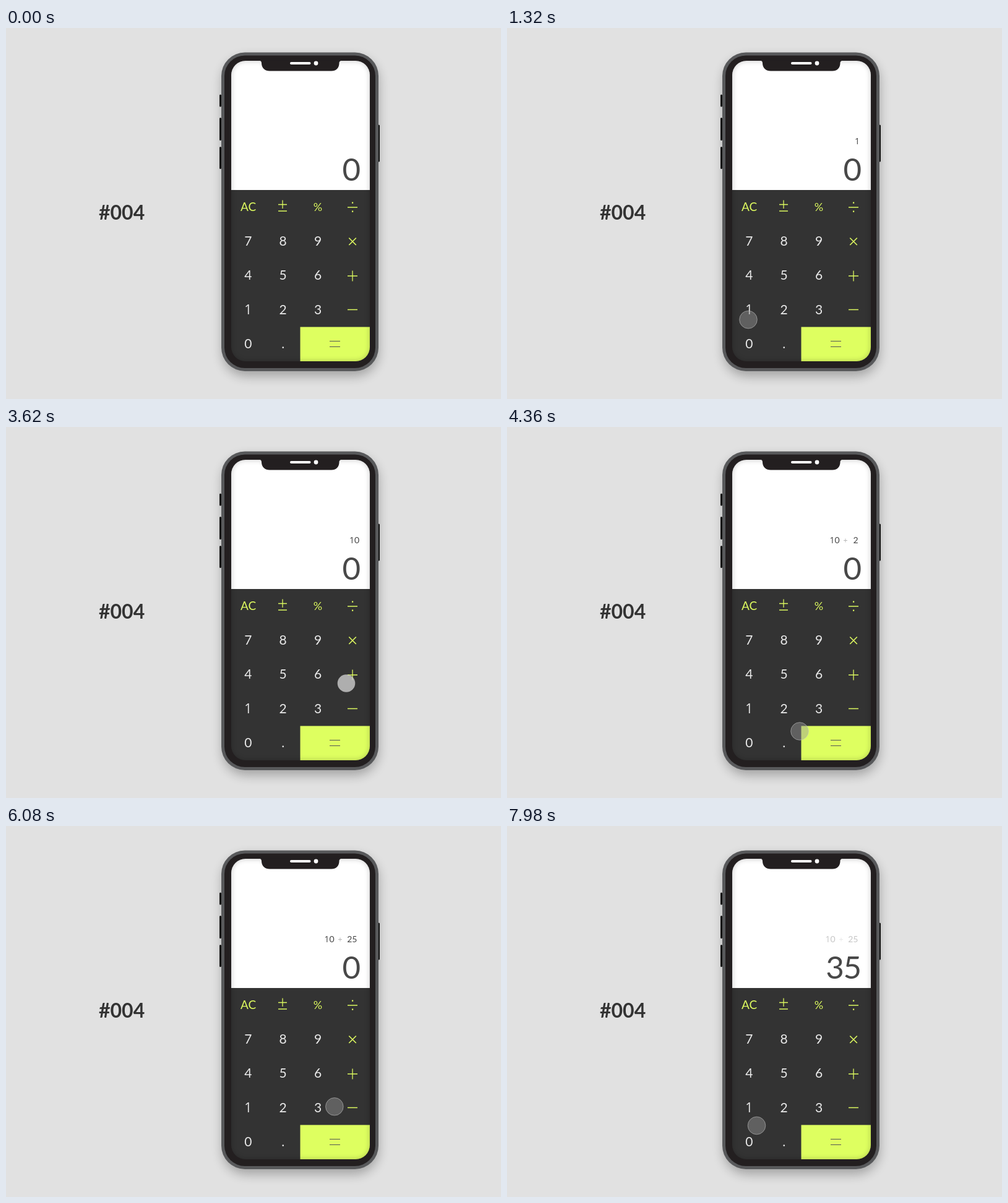
These frames come from a looping animation (800x600 px, 8000 ms). An HTML page:

```html
<!DOCTYPE html>
<html lang="en">
<head>
<meta charset="utf-8">
<title>Calculator</title>
<style>
  html, body { margin: 0; width: 100%; height: 100%; overflow: hidden; background: #e1e1e1; }
  svg { display: block; width: 800px; height: 600px; font-family: Lato, sans-serif; }
  .one { font-family: "Open Sans", sans-serif; }
  #keys text { text-anchor: middle; font-size: 21px; fill: #e9e9e9; }
  #keys .op { font-size: 19px; fill: #dcf95f; }
  .line { fill: none; stroke: #dcf95f; stroke-width: 1.3; }
  #expr { font-size: 14px; fill: #444; }
</style>
</head>
<body>
<svg viewBox="0 0 800 600">
  <defs>
    <clipPath id="screen"><rect x="364" y="53" width="224" height="486" rx="23"/></clipPath>
    <filter id="soft" x="-30%" y="-30%" width="160%" height="160%"><feGaussianBlur stdDeviation="9"/></filter>
    <filter id="edge"><feGaussianBlur stdDeviation="4"/></filter>
  </defs>

  <text x="150" y="309.5" font-size="32" font-weight="700" fill="#333">#004</text>

  <rect x="350" y="48" width="252" height="515" rx="38" opacity=".28" filter="url(#soft)"/>
  <path d="M346.5 109v17M346.5 146.500v34M346.5 193.500v33M602.500 158v57" stroke="#111" stroke-width="3" stroke-linecap="round"/>
  <rect x="348" y="39.500" width="254" height="515.500" rx="38" fill="#58595b"/>
  <rect x="353" y="44.500" width="244" height="505.500" rx="33" fill="#231f20"/>

  <g clip-path="url(#screen)">
    <rect x="364" y="53" width="224" height="210" fill="#fff"/>
    <rect x="364" y="262" width="224" height="278" fill="#333"/>
    <rect x="475.500" y="483.500" width="113" height="56" fill="#deff60"/>
    <rect x="361" y="50" width="230" height="492" rx="25" fill="none" stroke="#000" stroke-width="6" opacity=".25" filter="url(#edge)"/>
  </g>
  <path d="M408 52.500C412 53 413 54 413 57C413 65 419 69.500 426 69.500H526C533 69.500 538.500 65 538.500 57C538.500 54 540 53 544 52.500Z" fill="#231f20"/>
  <path d="M461 57h29.500" stroke="#fff" stroke-width="4" stroke-linecap="round"/>
  <circle cx="501" cy="57" r="3.400" fill="#fff"/>

  <g id="keys">
    <text class="op" x="391.500" y="296">AC</text>
    <text class="op" x="504" y="296" style="font-size:18px">%</text>
    <path class="line" d="M440 285.500h14M447 278.500v13.500M440 296h14M552 290h16M552 401h16M560 392.500v17M552 455.500h16"/>
    <path class="line" d="M554.300 339.500l11.500 11.500M565.800 339.500l-11.500 11.500" style="stroke-width:1.7"/>
    <path d="M559 281.500h2.200v2.200h-2.200zM559 295.500h2.200v2.200h-2.200z" fill="#dcf95f"/>
    <path d="M523 506.500h17M523 515.500h17" stroke="#555" stroke-width="1.200"/>
  </g>

  <g id="expr">
    <text id="first"><tspan class="one">1</tspan><tspan id="zero">0</tspan></text>
    <path id="plus" d="M-3 0h6M0 -3v6" stroke="#aaa" stroke-width=".8"/>
    <text id="second" x="567.500" y="188" text-anchor="end"></text>
  </g>
  <text id="result" x="571.500" y="247" font-size="51" letter-spacing="-1.500" text-anchor="end" fill="#484848"></text>
  <circle id="touch" r="14.300"/>
</svg>

<script>
const $ = id => document.getElementById(id);
const set = (id, attrs) => {
  for (const k in attrs) $(id).setAttribute(k, attrs[k]);
};

["789", "456", "123", "0."].forEach((row, r) => [...row].forEach((label, c) => {
  const key = document.createElementNS("http://www.w3.org/2000/svg", "text");
  key.setAttribute("x", 391.3 + c * 56.4);
  key.setAttribute("y", 352 + r * 55.4);
  key.textContent = label;
  if (label === "1") key.setAttribute("class", "one");
  $("keys").append(key);
}));

const smooth = u => u * u * (3 - 2 * u);
const easeIn = u => u * u;
const easeOut = u => 1 - (1 - u) ** 1.9;

// start, end, easing, Bezier points
const moves = [
  [60, 940, smooth, [[740.5, 15.5], [560, 500], [320, 590], [389.5, 469.5]]],
  [1240, 1680, smooth, [[389.5, 469.5], [395, 494]]],
  [1780, 2690, easeOut, [[395, 494], [525, 487], [550, 414.5]]],
  [3780, 4200, smooth, [[550, 414.5], [540, 480], [473, 492]]],
  [4580, 5260, smooth, [[473, 492], [446.8, 403.5]]],
  [5420, 6500, smooth, [[446.8, 403.5], [535, 420], [548, 500.5]]],
  [6940, 7980, easeIn, [[548, 500.5], [400, 550], [403.5, 484.5]]]
];
const presses = [[940, 1080], [1680, 1780], [3620, 3740], [4200, 4360], [5280, 5420], [6650, 6800]];

function bezier(points, s) {
  if (points.length === 1) return points[0];
  return bezier(points.slice(1).map((p, i) => p.map((v, k) => points[i][k] + (v - points[i][k]) * s)), s);
}

function draw(t) {
  const move = moves.filter(m => t >= m[0]).pop();
  $("touch").style.display = move ? "" : "none";
  if (move) {
    const [start, end, ease, points] = move;
    const [cx, cy] = bezier(points, ease(Math.min(1, (t - start) / (end - start))));
    const pressed = presses.some(([a, b]) => t >= a && t < b);
    set("touch", {
      cx, cy,
      fill: pressed ? "rgba(205,205,205,.8)" : "rgba(150,150,150,.45)",
      stroke: pressed ? "none" : "rgba(190,190,190,.6)"
    });
  }

  const second = t < 4360 ? "" : t < 5420 ? "2" : "25";
  const x = t < 1780 ? 562 : t < 3740 ? 555 : t < 4360 ? 537 : t < 5420 ? 521.5 : 514.5;
  const done = t >= 6940;
  set("first", { x, y: 188, visibility: t < 1080 ? "hidden" : "visible" });
  $("zero").textContent = t < 1780 ? "" : "0";
  set("plus", { transform: `translate(${x + 25.5} 183.5)`, visibility: t < 3740 ? "hidden" : "visible" });
  $("second").textContent = second;
  set("expr", { opacity: done ? 0.3 : 1 });
  $("result").textContent = done ? "35" : "0";
}

function tick() {
  draw(performance.now() % 8000);
  requestAnimationFrame(tick);
}
tick();
</script>
</body>
</html>
```
